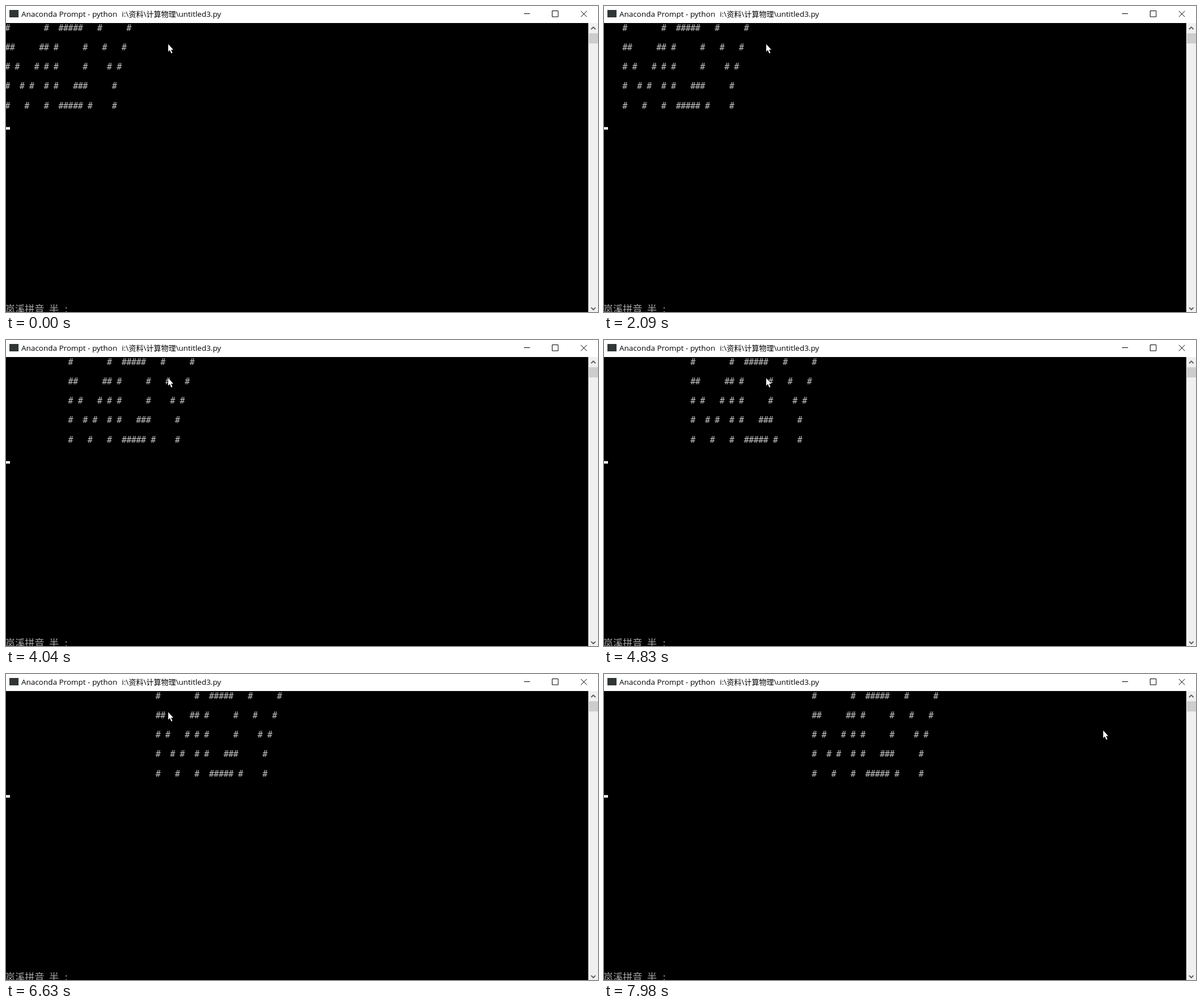
Write an HTML page that moves like this. It is 1040 px wide and 539 px high and loops after 8 s.

```html
<!DOCTYPE html>
<html lang="zh">
<head>
<meta charset="utf-8">
<title>Console banner</title>
<style>
  html, body { margin: 0; width: 100%; height: 100%; overflow: hidden; background: #000; }
  svg { display: block; width: 1040px; height: 539px; }
  .title { font: 13.45px "Open Sans", "Noto Sans", sans-serif; fill: #000; }
  .title .han { font: 13px "Noto Sans CJK SC", "Noto Sans CJK", sans-serif; }
  .banner { font: 15px "DejaVu Sans Mono", monospace; fill: #c0c0c0; text-anchor: middle; }
  .ime { font: 300 17.07px "Noto Sans Mono CJK SC", "Noto Sans CJK SC", "Noto Sans CJK", monospace; fill: #a8a8a8; }
  .line { fill: none; stroke: #000; stroke-width: 1; }
  .chevron { fill: none; stroke: #505a58; stroke-width: 1.8; }
</style>
</head>
<body>
<svg viewBox="0 0 1040 539" xmlns="http://www.w3.org/2000/svg">
  <rect width="1040" height="539" fill="#000"/>

  <g id="banner" class="banner"></g>
  <rect id="caret" y="213.3" width="7" height="4.4" fill="#fff"/>
  <text class="ime" y="540"><tspan x="-1">岚溪拼音</tspan><tspan x="75.8">半</tspan><tspan x="101.4">:</tspan></text>

  <rect width="1040" height="30" fill="#fff"/>
  <rect x="6" y="7" width="16" height="13" fill="#303636"/>
  <text class="title" y="19"><tspan x="27">Anaconda Prompt - python</tspan><tspan x="203.5">i:\</tspan><tspan class="han">资料</tspan><tspan>\</tspan><tspan class="han">计算物理</tspan><tspan>\untitled3.py</tspan></text>
  <path class="line" d="M910 13.5h10.5M959.5 8.5h10.5v10.5h-10.5zM1010 8.8l10.4 10.4M1020.4 8.8l-10.4 10.4"/>

  <rect x="1022.9" y="30" width="17.1" height="509" fill="#f0f0f0"/>
  <rect x="1024" y="48" width="16" height="18" fill="#cdcdcd"/>
  <path class="chevron" d="M1028 41l3.8-3.8 3.8 3.8M1028 531.2l3.8 3.8 3.8-3.8"/>

  <path id="mouse" d="M0 0V13.2L2.9 10.4 5.3 16.2 7.3 15.3 5 9.8H8.9Z" fill="#fff" stroke="#000" paint-order="stroke"/>
</svg>
<script>
const LOOP = 8000;
const CELL = 8.533;
const ROWS = [
  "#       #  #####   #     #",
  "##     ## #     #   #   #",
  "# #   # # #     #    # #",
  "#  # #  # #   ###     #",
  "#   #   #  ##### #    #"
];
const BLINK_START = 610, BLINK_PERIOD = 1270;

const byId = id => document.getElementById(id);
const banner = byId("banner"), caret = byId("caret"), mouse = byId("mouse");

ROWS.forEach((row, i) => {
  const text = document.createElementNS("http://www.w3.org/2000/svg", "text");
  const xs = [...row].flatMap((ch, col) => ch === "#" ? [(2.7 + col * CELL).toFixed(2)] : []);
  text.setAttribute("x", xs.join(" "));
  text.setAttribute("y", 44 + i * CELL * 4);
  text.textContent = "#".repeat(xs.length);
  banner.append(text);
});

// The banner speeds up evenly but moves in whole columns.
function columnsAt(t) {
  const s = t / 1000;
  return Math.max(0, Math.floor(1.44 * s + 0.51 * s * s - 0.8));
}

// Each blink hides the caret until the banner is printed again.
function caretHidden(t) {
  if (t < BLINK_START) return false;
  const blink = t - (t - BLINK_START) % BLINK_PERIOD;
  return columnsAt(t) === columnsAt(blink);
}

function ease(t, from, to) {
  const p = Math.min(1, Math.max(0, (t - from) / (to - from)));
  return p * p * (3 - 2 * p);
}

// A quick flick to the right, then a slow drift.
function pointerAt(t) {
  const flick = ease(t, 6860, 7240), drift = ease(t, 7320, 7840);
  return [285 + 576 * flick + 16 * drift, 67.2 + 22 * flick + 10.3 * drift];
}

function draw(t) {
  banner.setAttribute("transform", `translate(${columnsAt(t) * CELL} 0)`);
  caret.setAttribute("visibility", caretHidden(t) ? "hidden" : "visible");
  mouse.setAttribute("transform", `translate(${pointerAt(t)})`);
}

const start = performance.now();
function tick() {
  draw((performance.now() - start) % LOOP);
  requestAnimationFrame(tick);
}
tick();
</script>
</body>
</html>
```
